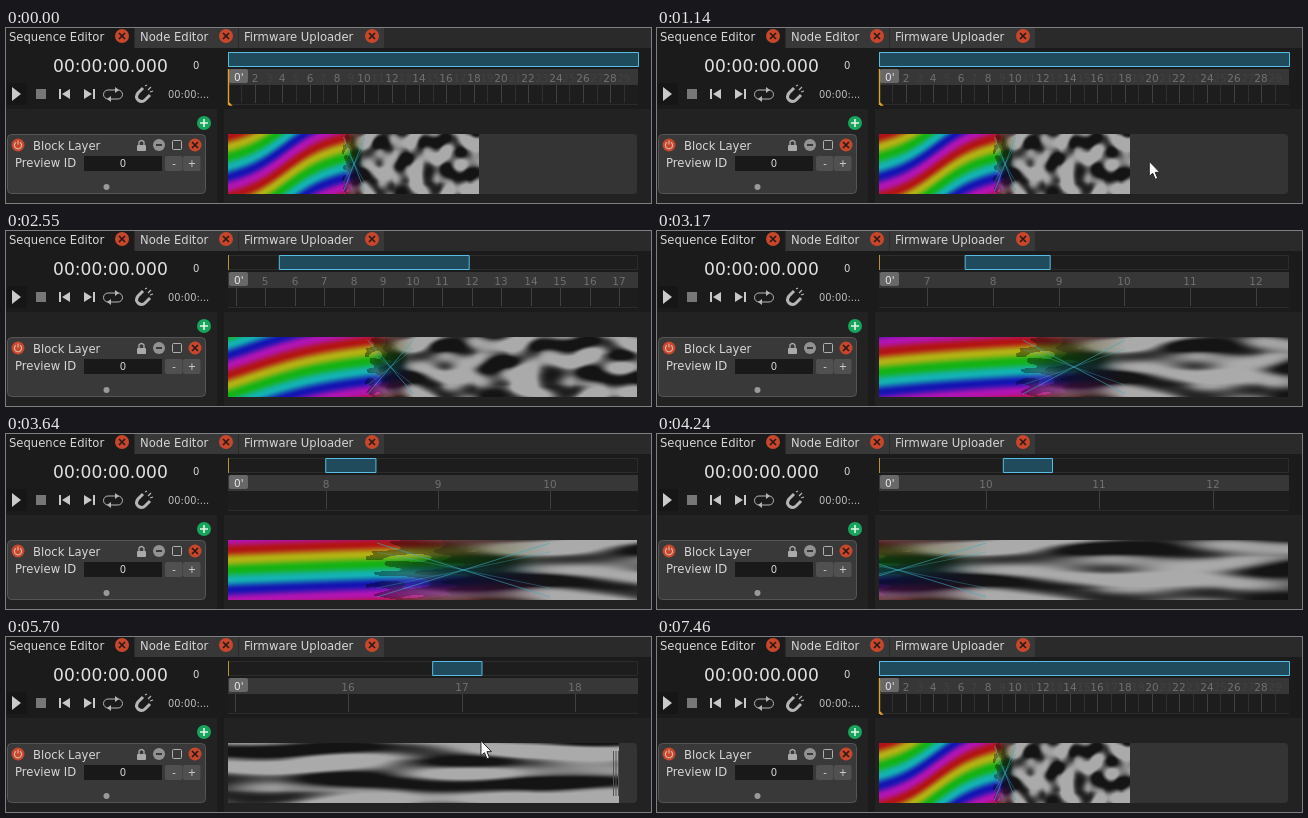
An HTML page with a canvas for the animation above (7530 ms loop, 645 px wide and 175 px high).

```html
<!DOCTYPE html>
<html lang="en">
<head>
<meta charset="utf-8">
<title>Sequence Editor</title>
<style>
  html, body { margin: 0; width: 100%; height: 100%; overflow: hidden; background: #1b1b1b; }
  canvas { display: block; }
</style>
</head>
<body>
<canvas id="stage" width="645" height="175"></canvas>
<script>
const LOOP = 7530, LEFT = 222, WIDTH = 410, TOTAL = 30, CLOSEST = 3.6;
const CLIP = { top: 106, height: 60, end: 18.38, fadeIn: 8.45, fadeOut: 10 };
const TEXTURE_SCALE = 114;
const ctx = document.getElementById('stage').getContext('2d');
const clamp = (v, lo = 0, hi = 1) => Math.min(hi, Math.max(lo, v));
const mix = (a, b, k) => a + (b - a) * k;
const ramp = (t, from, to) => clamp((t - from) / (to - from));
const smooth = k => k * k * (3 - 2 * k);

// Zoom in while drifting left, pan right, then zoom out again.
function viewAt(t) {
  const x = ramp(t, 2030, 3660), out = ramp(t, 5700, 6450);
  const zoom = x * (1.2 - .2 * x) - out;
  const span = TOTAL * (CLOSEST / TOTAL) ** zoom;
  const focus = 10 - 1.665 * ramp(t, 2080, 2540) + 7.81 * ramp(t, 4000, 4980) - 6.14 * out;
  return { start: clamp(focus - span / 3.01, 0, TOTAL - span), span };
}

function pointerAt(t) {
  if (t >= 1000 && t < 2030) {
    const k = smooth(ramp(t, 1000, 1420));
    return [mix(540, 358, k), mix(168, 36, k)];
  }
  if (t >= 4980 && t < 7450) {
    const up = ramp(t, 5700, 6450), leave = ramp(t, 7250, 7450);
    return [475 - 24 * up + 107 * leave, 104 - 70 * up - 60 * Math.sin(Math.PI * up) + 142 * leave];
  }
}

function rainbow(u, y) {
  const hue = (y - 62.5 + 7 * u - 4 * Math.sin(u * .75)) / CLIP.height;
  return [0, 4, 2].map(shift => {
    const h = (((hue * 6 + shift) % 6) + 6) % 6;
    return 20 + 158 * smooth(clamp(Math.abs(h - 3) - 1));
  });
}

// Gradient noise with seeded directions
function gradient(i, j, dx, dy) {
  const angle = Math.sin(i * 127.1 + j * 311.7) * 43758.5453;
  return dx * Math.cos(angle) + dy * Math.sin(angle);
}
function noise(x, y) {
  const i = Math.floor(x), j = Math.floor(y), dx = x - i, dy = y - j, k = smooth(dx);
  const row = n => mix(gradient(i, j + n, dx, dy - n), gradient(i + 1, j + n, dx - 1, dy - n), k);
  return mix(row(0), row(1), smooth(dy));
}

function makeTexture() {
  const { end, height, fadeIn, fadeOut } = CLIP;
  const canvas = document.createElement('canvas');
  const w = canvas.width = Math.round(end * TEXTURE_SCALE);
  canvas.height = height;
  const c = canvas.getContext('2d'), image = c.createImageData(w, height);
  for (let y = 0; y < height; y++) for (let x = 0; x < w; x++) {
    const u = x / TEXTURE_SCALE;
    const grey = 20 + 150 * smooth(ramp(noise(u / 1.1, y / 16), -.26, .2));
    const fade = ramp(u, fadeIn, fadeOut);
    const ragged = fade + .5 * noise(u * 3, y / 7);
    const dim = ragged < .12 ? 1 : ragged < .4 ? .62 : .45;
    const rgb = u > fadeOut ? [grey, grey, grey]
      : rainbow(u, y).map(v => mix(v * (u < fadeIn - .1 ? 1 : dim), grey, fade));
    image.data.set([...rgb, 255], (y * w + x) * 4);
  }
  c.putImageData(image, 0, 0);
  return canvas;
}
const texture = makeTexture();

function rect(x, y, w, h, fill, radius = 0, stroke) {
  ctx.beginPath();
  ctx.roundRect(x, y, w, h, radius);
  if (fill) { ctx.fillStyle = fill; ctx.fill(); }
  if (stroke) { ctx.strokeStyle = stroke; ctx.lineWidth = 1; ctx.stroke(); }
}
function disc(x, y, r, fill) {
  ctx.beginPath();
  ctx.arc(x, y, r, 0, 7);
  ctx.fillStyle = fill;
  ctx.fill();
}
function path(d, stroke, width = 1, fill) {
  const p = new Path2D(d);
  if (fill) { ctx.fillStyle = fill; ctx.fill(p); }
  if (stroke) { ctx.strokeStyle = stroke; ctx.lineWidth = width; ctx.stroke(p); }
}
function text(s, x, y, size = 11.6, color = '#d6d6d6', align = 'left') {
  ctx.font = `${size}px "DejaVu Sans", sans-serif`;
  ctx.textAlign = align;
  ctx.fillStyle = color;
  ctx.fillText(s, x, y);
}
function closeButton(x, y, r) {
  disc(x, y, r, '#c8472c');
  path(`M${x - 3} ${y - 3}l6 6m0-6l-6 6`, '#2a1a16', 1.7);
}
function button(label, x) {
  rect(x, 128, 17.5, 15, '#505050', 2);
  text(label, x + 9, 139, 10, '#d6d6d6', 'center');
}
function tab(label, x, close, fill) {
  rect(x - 5, 0, close + 17 - x, 20, fill);
  text(label, x, 13);
  closeButton(close, 8, 7);
}

function drawTabs() {
  rect(0, 0, 645, 20, '#2a2a2a');
  tab('Sequence Editor', 3, 116, '#1b1b1b');
  tab('Node Editor', 134, 220, '#383838');
  tab('Firmware Uploader', 238, 366, '#383838');
}

function drawTransport() {
  text('00:00:00.000', 47, 44, 17.1, '#e0e0e0');
  text('0', 187, 41, 10);
  rect(1, 55, 20, 22, '#161616', 2);
  path('M6 59L15 66L6 73Z', null, 0, '#cacaca');
  rect(30, 61, 10, 10, '#777');
  path('M64 61v10l-8-5zM53 61h2v10h-2zM78 61v10l8-5zM87 61h2v10h-2z', null, 0, '#c8c8c8');
  rect(97.5, 62, 19, 9, null, 4.5, '#b5b5b5');
  path('M109 59l4 3l-4 3zM105 68l-4 3l4 3z', null, 0, '#b5b5b5');
  path('M137 60l-5 5q-3 4 0 7q4 3 7 0l5-5', '#b5b5b5', 3);
  path('M139 58l2-1m3 7l3-1m-5-1l3-3', '#b5b5b5', 1.2);
  text('00:00:...', 162, 70, 9.9, '#bbb');
}

function drawLayer() {
  rect(0, 81, 211, 94, '#222');
  rect(218, 81, 427, 94, '#222');
  disc(198, 95, 7, '#18a45c');
  path('M194 95h8M198 91v8', '#e4f4e8', 1.6);
  rect(1.5, 106.5, 198, 59, '#393939', 4, '#555');
  disc(12, 117, 6.5, '#c8472c');
  path('M10 114.3a3.6 3.6 0 1 0 4 0M12 112.5v4', '#d9b0a4', 1.2);
  text('Block Layer', 27, 122);
  rect(131, 117, 9, 6, '#aaa', 1);
  path('M133 117v-3q2.5-3 5 0v3', '#aaa', 1.3);
  disc(153, 117, 6, '#929292');
  path('M150 117h6', '#303030', 1.8);
  rect(166.5, 112.5, 9, 9, null, 1, '#b0b0b0');
  closeButton(189, 117, 6.5);
  text('Preview ID', 9, 139);
  rect(78, 128, 78, 15, '#191919');
  text('0', 117, 139, 10, '#d6d6d6', 'center');
  button('-', 159);
  button('+', 177);
  disc(100.5, 159, 3, '#999');
}

function drawRuler({ start, span }, toX) {
  const scale = WIDTH / span, unit = WIDTH / TOTAL;
  rect(222.5, 24.5, 409, 14, '#1d1d1d', 0, '#2c2c2c');
  rect(LEFT, 24, 1, 15, '#b8942a');
  rect(LEFT + start * unit + .5, 24.5, span * unit, 14, '#1f4b5c', 0, '#58bde2');

  rect(LEFT, 41, WIDTH, 35, '#1d1d1d');
  rect(LEFT, 41, WIDTH, 16, '#373737');
  ctx.save();
  ctx.beginPath();
  ctx.rect(LEFT, 41, WIDTH, 36);
  ctx.clip();
  for (let u = Math.ceil(start); u < start + span; u++) {
    const x = Math.floor(toX(u));
    ctx.globalAlpha = u % 2 ? clamp((scale - 11) / 15) : 1;
    text(u, x, 54, 10.5, '#707070', 'center');
    ctx.globalAlpha = u % 2 ? clamp(scale / 25) : 1;
    rect(x, 57, 1, 18, '#414141');
  }
  ctx.restore();
  rect(LEFT, 76, WIDTH, 1, '#2c2c2c');
  rect(223, 41, 19, 14, '#686868', 2);
  text("0'", 228, 53, 10.5, '#e6e6e6');
  if (start < .05) path('M222.5 41V77M223 75l2 2h-2', '#e0a02c', 1.4);
}

function drawClip({ span }, toX) {
  const { top, height, end, fadeIn, fadeOut } = CLIP;
  const scale = WIDTH / span, bottom = top + height;
  rect(LEFT, top, WIDTH - 1, height, '#343434', 4);
  ctx.save();
  ctx.beginPath();
  ctx.rect(LEFT, top, WIDTH - 1, height);
  ctx.clip();
  ctx.drawImage(texture, toX(0), top, end * scale, height);
  const a = toX(fadeIn), b = toX(fadeOut);
  for (const inset of [3, 12]) {
    ctx.globalAlpha = inset > 5 ? .35 : .6;
    path(`M${a} ${top + inset}L${b} ${bottom - inset}M${a} ${bottom - inset}L${b} ${top + inset}`, '#3fa9c0');
  }
  ctx.globalAlpha = 1;
  if (scale > 60)
    for (let i = 0; i < 3; i++) rect(Math.round(toX(end)) - 1 - 2.5 * i, top + 8, 1, height - 15, '#555');
  ctx.restore();
}

function drawPointer(at) {
  if (!at) return;
  ctx.save();
  ctx.translate(...at);
  path('M0 0V15L3.5 12L6 18L8.5 17L6 11H10.5Z', '#222', 1, '#fff');
  ctx.restore();
}

function draw(t) {
  const view = viewAt(t), toX = u => LEFT + (u - view.start) * WIDTH / view.span;
  rect(0, 0, 645, 175, '#1b1b1b');
  drawTabs();
  drawTransport();
  drawLayer();
  drawRuler(view, toX);
  drawClip(view, toX);
  drawPointer(pointerAt(t));
}

const began = performance.now();
function frame() {
  draw((performance.now() - began) % LOOP);
  requestAnimationFrame(frame);
}
frame();
</script>
</body>
</html>
```
